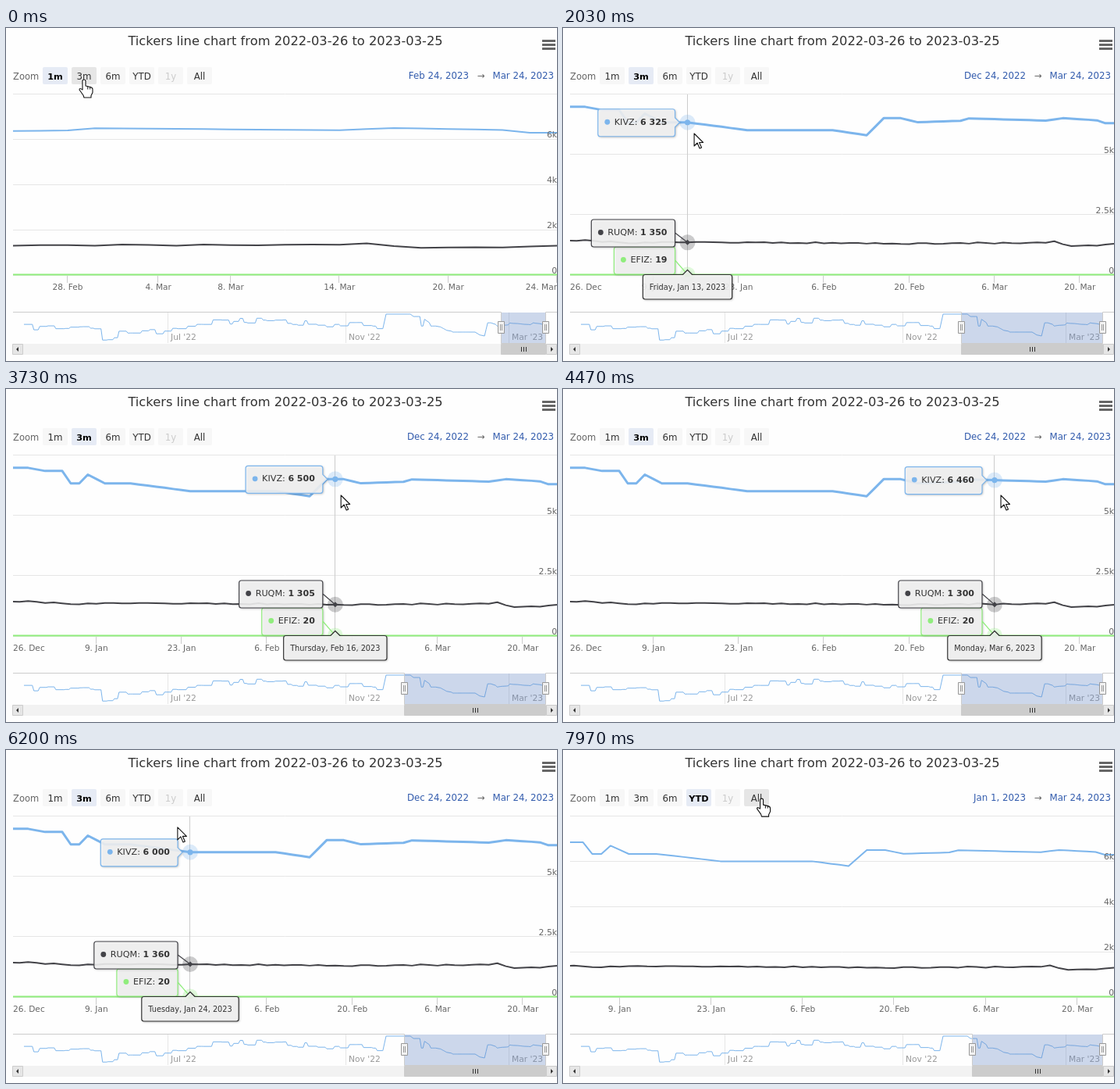
Animation of 706x426 px, one loop 8000 ms. Source, as an HTML page with a canvas:

```html
<!DOCTYPE html>
<html lang="en">
<head>
<meta charset="utf-8">
<title>Tickers line chart</title>
<style>
html, body { margin: 0; width: 100%; height: 100%; overflow: hidden; background: #fefefe; }
canvas { display: block; width: 706px; height: 426px; }
</style>
</head>
<body>
<canvas id="chart" width="706" height="426"></canvas>
<script>
const ctx = document.getElementById('chart').getContext('2d');
const LOOP = 8000, LEFT = 9, RIGHT = 706, TOP = 84.5, BASE = 316, LAST = 64;
const INK = '#333', SOFT = '#666', GRID = '#e6e6e6', RULE = '#ccc';
const BLUE = '#7cb5ec', DARK = '#434348', GREEN = '#90ed7d';
const ENTER = 1394, LEAVE = 6359, LAG = 30;

const mix = (a, b, p) => a + (b - a) * p;
const clamp = (v, lo, hi) => Math.max(lo, Math.min(hi, v));
const range = (n, f) => Array.from({ length: n }, (_, i) => f(i));

function seeded(seed) {
  return () => (seed = seed * 16807 % 2147483647) / 2147483647;
}
// Linear interpolation through [key, ...values], held at both ends.
function sample(keys, x) {
  const next = keys.findIndex(k => k[0] > x);
  if (next < 0) return keys[keys.length - 1].slice(1);
  if (next === 0) return keys[0].slice(1);
  const a = keys[next - 1], b = keys[next];
  return a.slice(1).map((v, i) => mix(v, b[i + 1], (x - a[0]) / (b[0] - a[0])));
}

// One value per trading day from Dec 26, 2022; noise only between key days.
function daily(keys, noise = 0) {
  const random = seeded(77);
  return range(LAST + 1, i => {
    const jitter = (random() - .5) * 2 * noise;
    const value = sample(keys, i)[0] + (keys.some(k => k[0] === i) ? 0 : jitter);
    return Math.round(value / 5) * 5;
  });
}
const high = daily([[2, 6970], [4, 6840], [6, 6840], [7, 6325], [8, 6325], [9, 6690], [11, 6325],
  [14, 6325], [17, 6190], [21, 6000], [31, 6000], [35, 5790], [37, 6500], [39, 6500], [41, 6330],
  [46, 6390], [47, 6490], [56, 6400], [58, 6500], [62, 6410], [63, 6290]]);
const low = daily([[0, 1430], [2, 1450], [7, 1320], [14, 1350], [21, 1360], [38, 1305], [56, 1335],
  [57, 1400], [59, 1200], [62, 1215], [64, 1300]], 28);
const flat = range(LAST + 1, i => i < 15 ? 19 : 20);

const series = [
  { name: 'KIVZ', color: BLUE, data: high },
  { name: 'RUQM', color: DARK, data: low, box: 245 },
  { name: 'EFIZ', color: GREEN, data: flat, box: 280 }
];

const fortnights = range(7, i => 14 * i);
const views = [
  { start: 0, button: 0, from: 'Feb 24, 2023', step: 34.83, tickSize: 2000, top: 8000, mask: 634,
    ticks: [64, 68, 72, 78, 84, 88] },
  { start: 700, button: 1, from: 'Dec 24, 2022', step: 10.93, tickSize: 2500, top: 7500, mask: 510,
    ticks: fortnights },
  { start: 7100, button: 3, from: 'Jan 1, 2023', step: 11.73, tickSize: 2000, top: 8000, mask: 524,
    ticks: fortnights.slice(1) }
];
const pointerPath = [[0, 100, 66], [1100, 101, 67], [1900, 130, 115], [2030, 168, 135], [2900, 242, 142],
  [3730, 429, 136], [5150, 682, 136], [5300, 682, 136], [6200, 220, 99], [6550, 172, 66],
  [7400, 172, 66], [7800, 252, 63], [8000, 255, 62]];
const arrow = new Path2D('M0 0v16l4-4 3 7 2.5-1-3-6.5h5z');
const hand = new Path2D('M3.5 2q0-2 2-2t2 2v6l6 1.5q3 .7 3 3v4l-2 4v2.5h-9l-1-3-5-7q0-3 4 0z');

// Weekends take the width of one trading step.
const tradingDay = d => Math.floor(d / 7) * 5 + (d % 7 <= 4 ? d % 7 : 4 + (d % 7 - 4) / 3);
const calendarDay = i => i + 2 * Math.floor(i / 5);
const dateOf = day => new Date(Date.UTC(2022, 11, 26) + day * 864e5);
const datePart = (date, options) => date.toLocaleDateString('en-US', { timeZone: 'UTC', ...options });

// The year's line: short plateaus around a slow trend, then the daily values.
function overviewLine() {
  const trend = [[23, 383], [112, 386], [125, 397], [150, 389], [200, 388], [235, 384], [265, 371],
    [288, 377], [303, 373], [400, 379], [450, 379], [478, 383]];
  const random = seeded(2022), points = [];
  for (let x = 23; x < 482;) {
    const y = sample(trend, x)[0] + (random() - .5) * 8, end = x + 2 + random() * 9;
    points.push([x, y], [end, y]);
    x = end + 2;
  }
  const recent = high.map((v, i) => [692 - (88 - calendarDay(i)) * 2.022, 389 - (v - 6000) * .0237]);
  return [...points, [487, 366], ...recent];
}
const overview = overviewLine();

function font(size, bold) {
  ctx.font = `${bold ? 'bold ' : ''}${size}px "DejaVu Sans", sans-serif`;
}
function text(str, x, y, size, { color = INK, align = 'left', bold = false } = {}) {
  font(size, bold);
  ctx.fillStyle = color;
  ctx.textAlign = align;
  ctx.fillText(str, x, y);
}
function textWidth(str, size, bold) {
  font(size, bold);
  return ctx.measureText(str).width;
}
function line(points, color, width = 1) {
  ctx.beginPath();
  points.forEach(p => ctx.lineTo(...p));
  ctx.strokeStyle = color;
  ctx.lineWidth = width;
  ctx.lineJoin = 'round';
  ctx.stroke();
}
function rect(x, y, w, h, fill, stroke) {
  ctx.fillStyle = fill;
  ctx.fillRect(x, y, w, h);
  if (!stroke) return;
  ctx.strokeStyle = stroke;
  ctx.lineWidth = 1;
  ctx.strokeRect(x, y, w, h);
}
function polygon(points, color) {
  ctx.beginPath();
  points.forEach(p => ctx.lineTo(...p));
  ctx.fillStyle = color;
  ctx.fill();
}
function disc(x, y, r, color) {
  ctx.beginPath();
  ctx.arc(x, y, r, 0, 7);
  ctx.fillStyle = color;
  ctx.fill();
}

function currentView(t) {
  const n = views.filter(v => v.start <= t).length - 1;
  const view = views[n], old = views[Math.max(0, n - 1)];
  const ease = (1 - Math.cos(Math.PI * clamp((t - view.start) / 300, 0, 1))) / 2;
  const step = mix(old.step, view.step, ease);
  const top = mix(old.top, view.top, ease);
  return {
    ...view, step,
    mask: mix(old.mask, view.mask, ease),
    x: i => RIGHT - step * (LAST - i),
    y: v => BASE - v / top * (BASE - TOP)
  };
}

function drawHeader(view, px, py) {
  text('Tickers line chart from 2022-03-26 to 2023-03-25', 358, 22, 16.3, { align: 'center' });
  for (const y of [15, 20, 25]) rect(687, y, 17, 3, SOFT);
  text('Zoom', LEFT, 66, 11.5, { color: SOFT });
  ['1m', '3m', '6m', 'YTD', '1y', 'All'].forEach((label, n) => {
    const x = 47 + 37 * n, active = n === view.button, disabled = n === 4;
    const hover = px >= x && px <= x + 32 && py >= 50 && py <= 72;
    ctx.beginPath();
    ctx.roundRect(x, 50, 32, 22, 2);
    ctx.fillStyle = active ? '#e6ebf5' : hover ? GRID : '#f7f7f7';
    ctx.fill();
    text(label, x + 16, 66, active ? 11.3 : 11.8,
      { align: 'center', bold: active, color: active ? '#000' : disabled ? RULE : INK });
  });
  const dateColor = '#335cad';
  text(view.from, 593, 65, 11.8, { align: 'right', color: dateColor });
  text('→', 609, 65, 11.8, { align: 'center', color: SOFT });
  text('Mar 24, 2023', 702, 65, 11.8, { align: 'right', color: dateColor });
}

function drawAxes(view) {
  for (let v = 0; v <= view.top; v += view.tickSize) {
    const y = Math.floor(view.y(v)) + .5;
    line([[LEFT, y], [RIGHT, y]], GRID);
  }
  for (const day of view.ticks) {
    const date = dateOf(day), x = view.x(tradingDay(day));
    const label = `${date.getUTCDate()}. ${datePart(date, { month: 'short' })}`;
    const half = textWidth(label, 10.6) / 2;
    const tick = Math.round(x) - .5;
    if (x > LEFT) line([[tick, 317], [tick, 326]], RULE);
    text(label, clamp(x, LEFT + half, RIGHT - half), 335, 10.6, { align: 'center', color: SOFT });
  }
}

function drawSeries(view, hovered) {
  ctx.save();
  ctx.beginPath();
  ctx.rect(LEFT, TOP, RIGHT - LEFT, 235);
  ctx.clip();
  for (const s of series)
    line(s.data.map((v, i) => [view.x(i), view.y(v)]), s.color, s === series[0] && hovered ? 3 : 2);
  ctx.restore();
}

function drawYLabels(view) {
  for (let v = 0; v < view.top; v += view.tickSize)
    text(v ? v / 1000 + 'k' : '0', RIGHT, view.y(v) - 2, 10.8, { align: 'right', color: SOFT });
}

function drawNavigator(view) {
  for (const [x, label] of [[207.5, "Jul '22"], [435.5, "Nov '22"], [644.5, "Mar '23"]]) {
    line([[x, 364], [x, 403]], GRID);
    text(label, x + 3.5, 399, 10.7, { color: '#999' });
  }
  line(overview, BLUE);
  const left = Math.round(view.mask) + .5, end = 691.5;
  rect(left, 364, end - left, 40, 'rgba(102,133,194,.33)');
  line([[LEFT, 363.5], [left, 363.5], [left, 403.5], [end, 403.5], [end, 363.5], [RIGHT, 363.5]], RULE);
  for (const x of [left, end]) {
    rect(x - 4, 375.5, 8, 15, '#f2f2f2', '#999');
    for (const dx of [-1, 1]) line([[x + dx, 379], [x + dx, 387]], '#999');
  }
  rect(LEFT, 404, 697, 14, '#f2f2f2');
  rect(left, 404.5, end - left, 13, RULE, RULE);
  const mid = Math.round((left + end) / 2) + .5;
  for (const dx of [-3, 0, 3]) line([[mid + dx, 408], [mid + dx, 414]], INK);
  for (const [x, dir] of [[8.5, -1], [692.5, 1]]) {
    rect(x, 404.5, 13, 13, GRID, RULE);
    polygon([[x + 6.5 + 2 * dir, 411], [x + 6.5 - dir, 408], [x + 6.5 - dir, 414]], INK);
  }
}

// Rounded box whose outline runs through extra points on its top or right side.
function drawBox(left, top, w, h, color, { above = [], beside = [] }) {
  const right = left + w, bottom = top + h, path = new Path2D();
  path.moveTo(left + 3, top);
  above.forEach(p => path.lineTo(...p));
  path.arcTo(right, top, right, top + 3, 3);
  beside.forEach(p => path.lineTo(...p));
  path.arcTo(right, bottom, left, bottom, 3);
  path.arcTo(left, bottom, left, top, 3);
  path.arcTo(left, top, right, top, 3);
  path.closePath();
  ctx.save();
  ctx.shadowColor = 'rgba(0,0,0,.35)';
  ctx.shadowOffsetX = ctx.shadowOffsetY = 1;
  ctx.shadowBlur = 3;
  ctx.fillStyle = 'rgba(247,247,247,.87)';
  ctx.fill(path);
  ctx.restore();
  ctx.strokeStyle = color;
  ctx.lineWidth = 1.2;
  ctx.stroke(path);
}

function drawValueBox(s, i, x, y) {
  const value = String(s.data[i]).replace(/(\d)(\d{3})$/, '$1 $2');
  const label = s.name + ': ';
  const labelWidth = textWidth(label, 11.2);
  const w = 31 + labelWidth + textWidth(value, 11, true);
  const right = x - 16, left = right - w, top = s.box || y - 17;
  const beside = s.box
    ? [[right, top + 17], [x, y], [right, top + 17]]
    : [[right, y - 6], [right + 6, y], [right, y + 6]];
  drawBox(left, top, w, 35, s.color, { beside });
  disc(left + 12, top + 16.5, 3.4, s.color);
  text(label, left + 21, top + 20, 11.2);
  text(value, left + 21 + labelWidth, top + 20, 11, { bold: true });
}

function drawDateBox(i, x) {
  const label = datePart(dateOf(calendarDay(i)),
    { weekday: 'long', month: 'short', day: 'numeric', year: 'numeric' });
  const w = textWidth(label, 9.75) + 17;
  const left = Math.min(x - w / 2, 715 - w);
  drawBox(left, 315.5, w, 31.5, INK, { above: [[x - 6, 315.5], [x, 309.5], [x + 6, 315.5]] });
  text(label, left + 8.5, 335, 9.75);
}

function drawMarker(n, x, y, color) {
  if (n === 0) disc(x, y, 3.6, color);
  else if (n === 1) polygon([[x, y - 3.5], [x + 3.5, y], [x, y + 3.5], [x - 3.5, y]], color);
  else rect(x - 3, y - 3, 6, 6, color);
}

function drawHover(view, t) {
  const [px] = sample(pointerPath, Math.min(t, LEAVE) - LAG);
  const i = clamp(Math.round(LAST - (RIGHT - px) / view.step), 0, LAST);
  const x = view.x(i), cross = Math.round(x) - .5;
  const alpha = clamp((LEAVE + 700 - t) / 200, 0, 1);
  ctx.save();
  ctx.globalAlpha = alpha;
  line([[cross, 85], [cross, 316]], RULE);
  series.forEach((s, n) => {
    const y = view.y(s.data[i]);
    ctx.globalAlpha = alpha * .27;
    disc(x, y, 10, s.color);
    ctx.globalAlpha = alpha;
    drawMarker(n, x, y, s.color);
  });
  for (const s of [...series].reverse()) drawValueBox(s, i, x, view.y(s.data[i]));
  drawDateBox(i, x);
  ctx.restore();
}

function drawPointer(x, y) {
  const onButton = y < 73, shape = onButton ? hand : arrow;
  ctx.save();
  ctx.translate(x - (onButton ? 5.5 : 0), y);
  ctx.fillStyle = '#fff';
  ctx.fill(shape);
  ctx.strokeStyle = '#111';
  ctx.lineWidth = 1.1;
  ctx.lineJoin = 'round';
  ctx.stroke(shape);
  if (onButton) for (const fx of [10.3, 13.2]) line([[fx, 9], [fx, 12.5]], '#111');
  ctx.restore();
}

function draw(now) {
  const t = now % LOOP;
  const view = currentView(t);
  const [px, py] = sample(pointerPath, t);
  const hovered = t > ENTER && t < LEAVE + 700;
  rect(0, 0, 706, 426, '#fefefe');
  drawHeader(view, px, py);
  drawAxes(view);
  drawSeries(view, hovered);
  drawYLabels(view);
  drawNavigator(view);
  if (hovered) drawHover(view, t);
  drawPointer(px, py);
  requestAnimationFrame(() => draw(performance.now() - begin));
}
const begin = performance.now();
draw(0);
</script>
</body>
</html>
```
